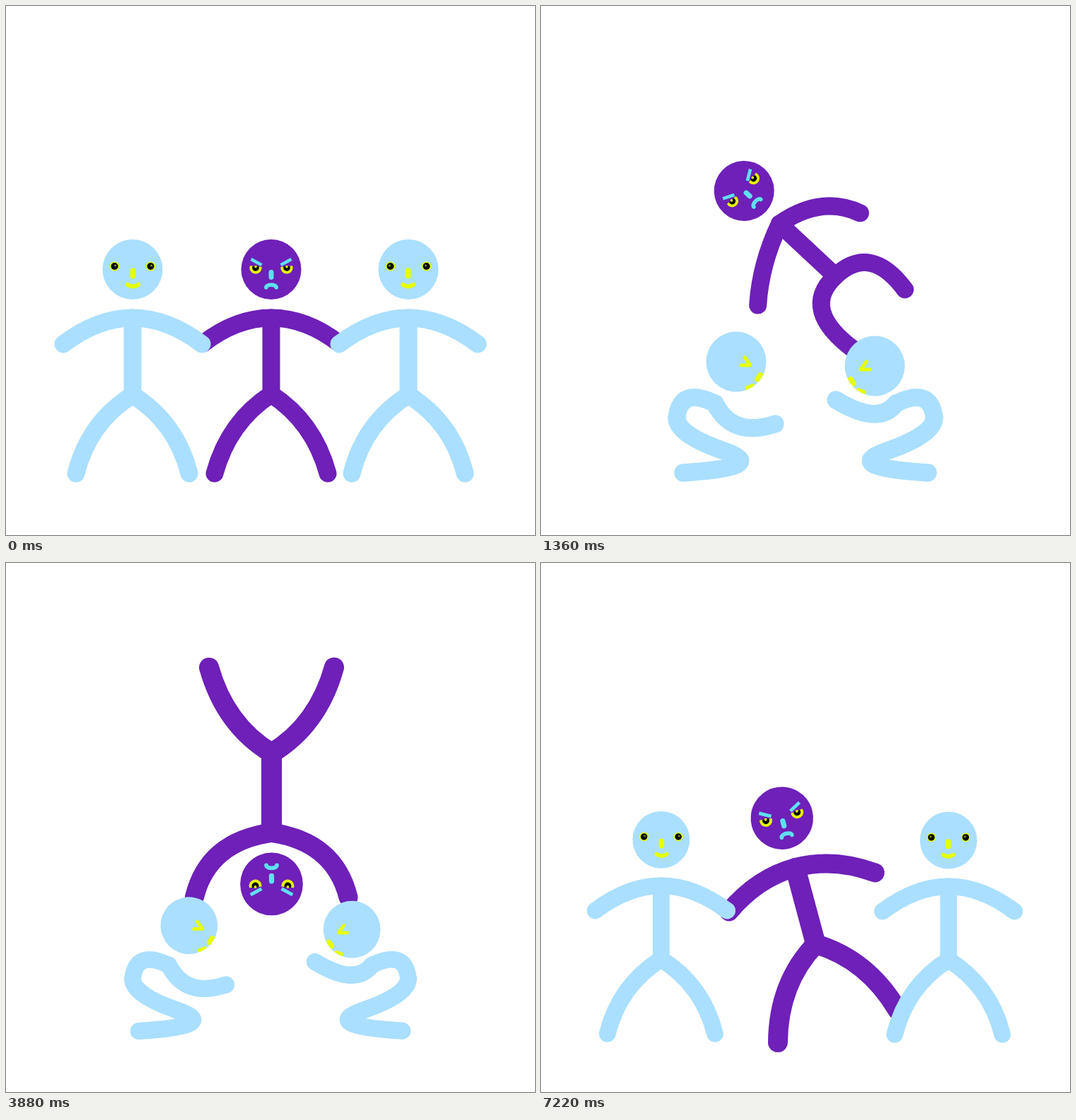
Animation, 748 px wide and 748 px high, one loop 7.26 s. Source, as an HTML page with a canvas:

```html
<!DOCTYPE html>
<html>
<head>
<meta charset="utf-8">
<style>
html, body { margin: 0; height: 100%; overflow: hidden; background: #fff; }
canvas { display: block; }
</style>
</head>
<body>
<canvas id="stage" width="748" height="748"></canvas>
<script>
const ctx = document.getElementById('stage').getContext('2d');
const PURPLE = '#6e20b8', BLUE = '#aadfff', YELLOW = '#e6ff00', CYAN = '#5fe0f0';
const STEP = 40, LOOP = 7260, RETURN = 6820, LAST = 107;
const rad = d => d * Math.PI / 180;

const mix = (a, b, k) => Array.isArray(a) ? a.map((v, i) => mix(v, b[i], k)) : a + (b - a) * k;
const ramp = (f, from, to) => Math.max(0, Math.min(1, (f - from) / (to - from)));
const flip = (limb, axis = 0) => limb.map(([x, y]) => [2 * axis - x, y]);

function track(keys, f) {
  let i = 0;
  while (i < keys.length - 2 && f >= keys[i + 1][0]) i++;
  const [fa, a] = keys[i], [fb, b] = keys[i + 1];
  return mix(a, b, ramp(f, fa, fb));
}

function stroke(color, width, cap = 'round') {
  ctx.strokeStyle = color;
  ctx.lineWidth = width;
  ctx.lineCap = cap;
  ctx.stroke();
}

function line(points, color, width, cap) {
  ctx.beginPath();
  for (const [x, y] of points) ctx.lineTo(x, y);
  stroke(color, width, cap);
}

// Smooth curve: the inner points pull it, the ends are touched
function curve(points, color, width) {
  const end = points.length - 1;
  ctx.beginPath();
  ctx.moveTo(...points[0]);
  for (let i = 1; i < end; i++) {
    const stop = i < end - 1 ? mix(points[i], points[i + 1], .5) : points[end];
    ctx.quadraticCurveTo(...points[i], ...stop);
  }
  stroke(color, width);
}

function disc(x, y, r, color, from = 0, to = 360) {
  ctx.beginPath();
  ctx.arc(x, y, r, rad(from), rad(to));
  ctx.fillStyle = color;
  ctx.fill();
}

// ---- Purple acrobat: limbs are [pull, tip] around the body centre, upright ----
const pair = limb => [limb, flip(limb)];
const legs = pair([[-60, 90], [-80, 163]]);
const free = [...pair([[-49, -57], [-96, -21]]), ...legs];
const held = [...pair([[-90, -43], [-45, 17]]), ...legs];
const handstand = [...pair([[-85, -71], [-97, -161]]), ...legs];
const kick = [
  [[-60, -38], [-105, -1]], [[70, -42], [89, 16]],
  [[-70, 46], [-58, 144]], [[68, 56], [53, 136]]
];
const wide = [
  [[-125, -96], [-223, -60]], [[135, -93], [229, -57]],
  [[-122, 105], [-172.5, 274]], [[122, 108], [172.5, 272]]
];
// head y, head radius, shoulder, hip, then torso, arm and leg widths
const SMALL = [-125.5, 42.5, -57, 51, 25, 25, 25];
const BIG = [-210.5, 62.7, -96, 60, 69, 48, 60];
const acro = (x, y, turn, limbs, size = SMALL) => [[x, y, turn], size, limbs];
const stand = acro(375, 498, 0, free);
const landed = acro(375.5, 314, -180, handstand);
const near = acro(375.5, 388, -180, wide, BIG);
const acroKeys = [
  [0, stand],
  [12, acro(375, 498, 0, held)],
  [18, stand],
  [30, acro(376, 259, -8, free)],
  [34, acro(379, 347, -47, kick)],
  [48, acro(376, 242, -180, free)],
  [54, landed],
  [96, landed],
  [LAST, near]
];

function angryFace(open, look) {
  ctx.translate(look, 0);
  for (const side of [-1, 1]) {
    ctx.save();
    ctx.scale(side, 1);
    disc(22, -2.5, 8.6, YELLOW, -18, 186);
    disc(22, -2.5, 4.8, '#000', -28, 200);
    disc(22, -3.8, 1.8, YELLOW);
    line([[28.5, -14.5], [13.5, -6.3]], CYAN, 4.6, 'butt');
    ctx.restore();
  }
  line([[0, 4], [0, 11]], CYAN, 7);
  const w = 7.2 + 6.8 * open, y = 25.5 - 3.5 * open;
  ctx.beginPath();
  ctx.moveTo(-w, y);
  ctx.bezierCurveTo(-w, y - 5, w, y - 5, w, y);
  ctx.bezierCurveTo(w, y - 5 + 13 * open, -w, y - 5 + 13 * open, -w, y);
  stroke(CYAN, 5.5);
}

function drawAcrobat([[x, y, turn], size, limbs], open = 0, look = 0) {
  const [headY, r, shoulder, hip, torso, arm, leg] = size;
  ctx.save();
  ctx.translate(x, y);
  ctx.rotate(rad(turn));
  line([[0, shoulder], [0, hip]], PURPLE, torso, 'butt');
  limbs.forEach((limb, i) => curve([[0, i < 2 ? shoulder : hip], ...limb], PURPLE, i < 2 ? arm : leg));
  ctx.translate(0, headY);
  disc(0, 0, r, PURPLE);
  ctx.scale(r / 42.5, r / 42.5);
  angryFace(open, look);
  ctx.restore();
}

// ---- Blue helpers: stage coordinates for the left one, mirrored for the right ----
// Pose: head [x, y, tilt, turn], shoulder, spine pull, hip, two arms, two legs
function front(x) {
  const hip = [x, 550], pull = [x - 62, 589], foot = [x - 80, 661];
  const arm = [[x - 49, 441], [x - 98, 478]];
  const leg = [mix(hip, pull, .5), mix(pull, foot, .5), foot];
  return [[x, 372.5, 0, 0], [x, 441], [x, 495], hip, arm, flip(arm, x), leg, flip(leg, x)];
}
const profile = (head, shoulder, spine, hip, arm, leg) =>
  [head, shoulder, spine, hip, arm, arm, leg, leg];
const squat = profile([259, 425.5, 0, 1], [246, 492], [188, 570], [224, 600],
  [[277, 544], [328, 515]], [[255, 628], [295, 663], [203, 661]]);
const low = (headY, lift) => profile([276, headY, 32, 1], [246, 562], [197, 538], [192, 582],
  [[271, 611 - lift / 2], [331, 591 - lift]], [[192, 606], [325, 652], [201, 660]]);
const home = front(179);
const helperKeys = [low(503, 0), low(509, 34)].map(end =>
  [[0, home], [6, front(122)], [12, squat], [18, squat], [32, end], [96, end]]);

function eye(x, y) {
  disc(x, y, 6.6, YELLOW);
  disc(x, y, 5, '#000');
  disc(x + 1, y - 1, 1.5, '#8c9400');
}

function calmFace(turn, squint) {
  const noseX = .5 + 38.5 * turn, noseY = 5.5 - 4 * turn, mouthX = .5 + 35 * turn;
  if (squint) {
    line([[7, -11.5], [19.6, -6.4], [8.6, .5]], YELLOW, 5);
    line([[32.7, 23.2], [37.9, 16.4]], YELLOW, 6);
  } else {
    eye(-25.5 + 37.5 * turn, -4.5 - turn);
    eye(25.5 + 26 * turn, -4.5);
    if (turn < .7) {
      curve([[mouthX - 7.5, 21.5], [mouthX, 26.5], [mouthX + 7.5, 21.5]], YELLOW, 6);
    } else {
      ctx.beginPath();
      ctx.ellipse(mouthX, 24.5, 4, 7, rad(30), 0, 7);
      ctx.fillStyle = '#e8506a';
      ctx.fill();
      stroke(YELLOW, 4.5);
    }
  }
  line([[noseX, noseY - 3.5], [noseX, noseY + 3.5]], YELLOW, 8);
}

function drawHelper(pose, isRight, squint, [x, y, scale]) {
  const [[hx, hy, tilt, turn], shoulder, spine, hip, ...limbs] = pose;
  ctx.save();
  if (isRight) {
    ctx.translate(748, 0);
    ctx.scale(-1, 1);
  }
  ctx.translate(x, y);
  ctx.scale(scale, scale);
  ctx.translate(-hx, -hy);
  curve([shoulder, spine, hip], BLUE, 25);
  limbs.forEach((limb, i) => curve([i < 2 ? shoulder : hip, ...limb], BLUE, 25));
  ctx.translate(hx, hy);
  ctx.rotate(rad(tilt));
  disc(0, 0, 42.5, BLUE);
  ctx.clip();
  calmFace(turn, squint);
  ctx.restore();
}

function draw(t) {
  ctx.clearRect(0, 0, 748, 748);
  ctx.lineJoin = 'round';
  if (t >= RETURN) {
    const k = (1 + Math.floor((t - RETURN) / STEP)) / 12;
    drawAcrobat(mix(near, stand, k));
    for (const i of [0, 1]) {
      drawHelper(home, i, false, mix([67, 598, .41], [179.3 + 2 * i, 372.5 + i, 1], k));
    }
    return;
  }
  const f = Math.min(LAST, Math.floor(t / STEP));
  const open = ramp(f, 54, 62) - ramp(f, 76, 88);
  const look = 8 * Math.sin(2 * Math.PI * ramp(f, 76, 88));
  drawAcrobat(track(acroKeys, f), open, look);
  if (f === LAST) return;
  for (const i of [0, 1]) {
    const pose = track(helperKeys[i], f), [hx, hy] = pose[0];
    drawHelper(pose, i, f >= 28, mix([hx, hy, 1], [88, 610, .45], ramp(f, 96, LAST)));
  }
}

const begin = performance.now();
function tick() {
  draw((performance.now() - begin) % LOOP);
  requestAnimationFrame(tick);
}
tick();
</script>
</body>
</html>
```
